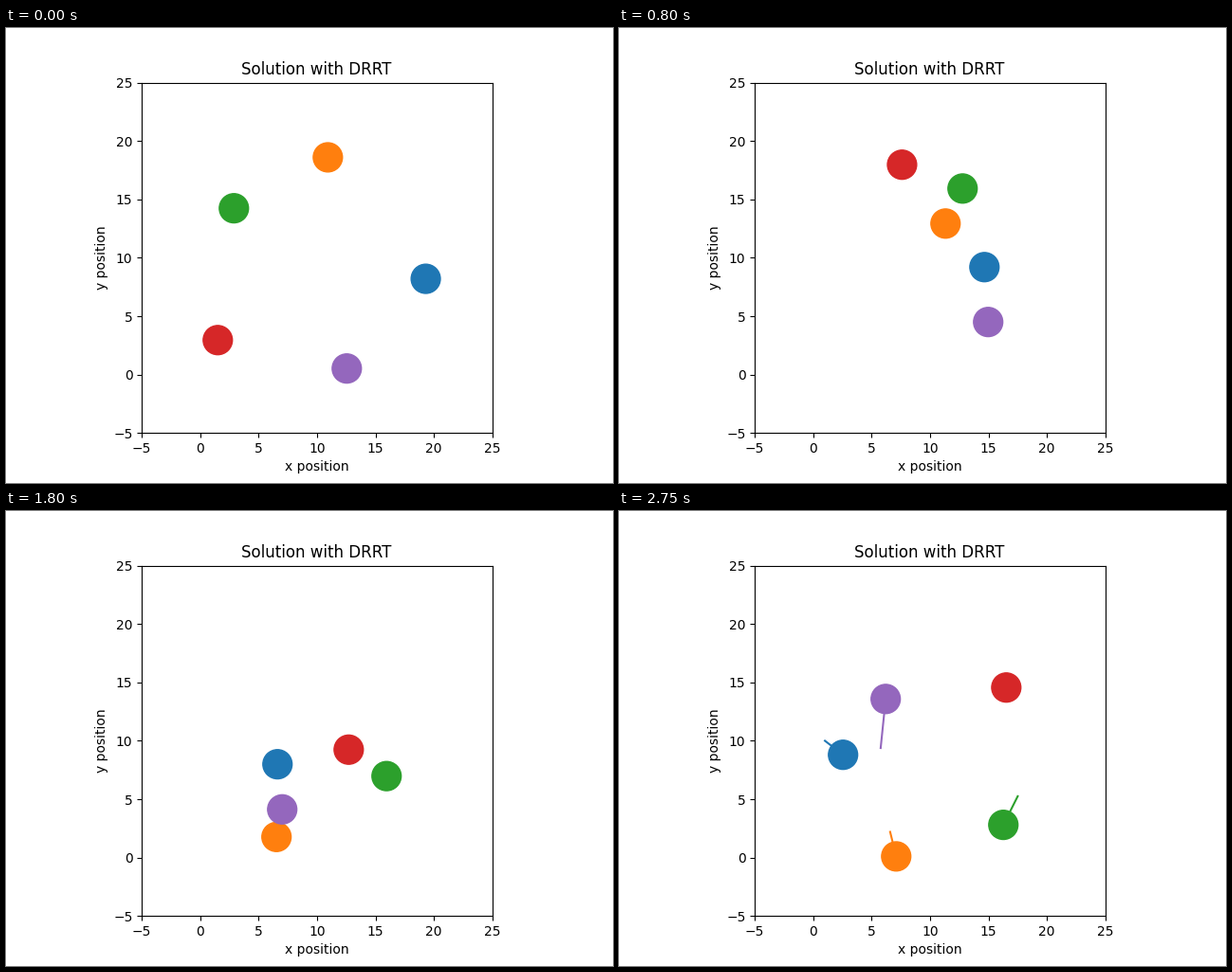
Animation of 640 by 480 pixels, one loop 2800 ms. Source, as a matplotlib script:

```python
import numpy as np
import matplotlib.pyplot as plt
from matplotlib.animation import FuncAnimation

HOLD = 5       # frames spent on each stop
RADIUS = 1.25

# Crossings of the roadmap that several routes pass through.
EAST, WEST = 12.79 + 10.18j, 7.83 + 9.87j
SOUTH, SOUTHEAST, SOUTHWEST = 10.43 + 4.0j, 14.97 + 4.5j, 5.95 + 3.43j
GOAL = 7.1 + 0.1j

# Key points of each robot as x + yj; stops in between are interpolated.
KEY_STEPS = [0, 1, 2, 3, 4, 5, 6, 8, 10, 11]
ROUTES = [
    [19.3 + 8.2j, 16.8 + 7.75j, 19.45 + 8.4j, 14.65 + 9.2j, 12.45 + 4.1j,
     SOUTH, 7.5 + 6.28j, 5.72 + 9.7j, 1 + 10j, 2.55 + 8.8j],
    [10.92 + 18.6j, 8.65 + 18j, 12.46 + 15.77j, 11.32 + 12.93j, EAST,
     9.05 + 8.87j, SOUTHWEST, GOAL, 6.58 + 2.2j, GOAL],
    [2.88 + 14.24j, 5.55 + 20.17j, 11.4 + 20.4j, 12.78 + 15.93j,
     13.75 + 15.5j, 17.9 + 13.67j, 16.92 + 9.45j, SOUTHEAST,
     17.5 + 5.25j, 16.27 + 2.8j],
    [1.5 + 2.95j, WEST, 0.45 + 12.77j, 7.6 + 17.97j, WEST,
     9.46 + 6.35j, 12.62 + 8.3j, EAST, 15.7 + 14.05j, 16.52 + 14.56j],
    [12.54 + 0.52j, 10.4 + 2.95j, 13.92 + 4.66j, SOUTHEAST, SOUTHWEST,
     11.97 + 1j, SOUTH, 3.6 + 4.25j, 5.77 + 9.38j, 6.2 + 13.58j],
]

steps = np.arange(KEY_STEPS[-1] + 1)
paths = [np.interp(steps, KEY_STEPS, route) for route in ROUTES]

fig, ax = plt.subplots(figsize=(6.4, 4.8), dpi=100)
ax.set_aspect("equal")
ax.set(xlim=(-5, 25), ylim=(-5, 25), xlabel="x position", ylabel="y position",
       xticks=range(-5, 26, 5), yticks=range(-5, 26, 5))
ax.set_title("Solution with DRRT", x=0.498)

discs, trails = [], []
for i in range(len(paths)):
    color = f"C{i}"
    discs.append(ax.add_patch(plt.Circle((0, 0), RADIUS, color=color)))
    trails.append(ax.plot([], [], color=color)[0])


def update(frame):
    step, phase = divmod(frame, HOLD)
    jumping = step > 0 and phase == 0
    for path, disc, trail in zip(paths, discs, trails):
        disc.center = path[step].real, path[step].imag
        # The travelled edge flashes only on the frame of the jump.
        edge = path[step - 1:step + 1] if jumping else path[:0]
        trail.set_data(edge.real, edge.imag)
    return discs + trails


anim = FuncAnimation(fig, update, frames=HOLD * int(steps[-1]) + 1,
                     interval=50, repeat=True, repeat_delay=0)
plt.show()
```
